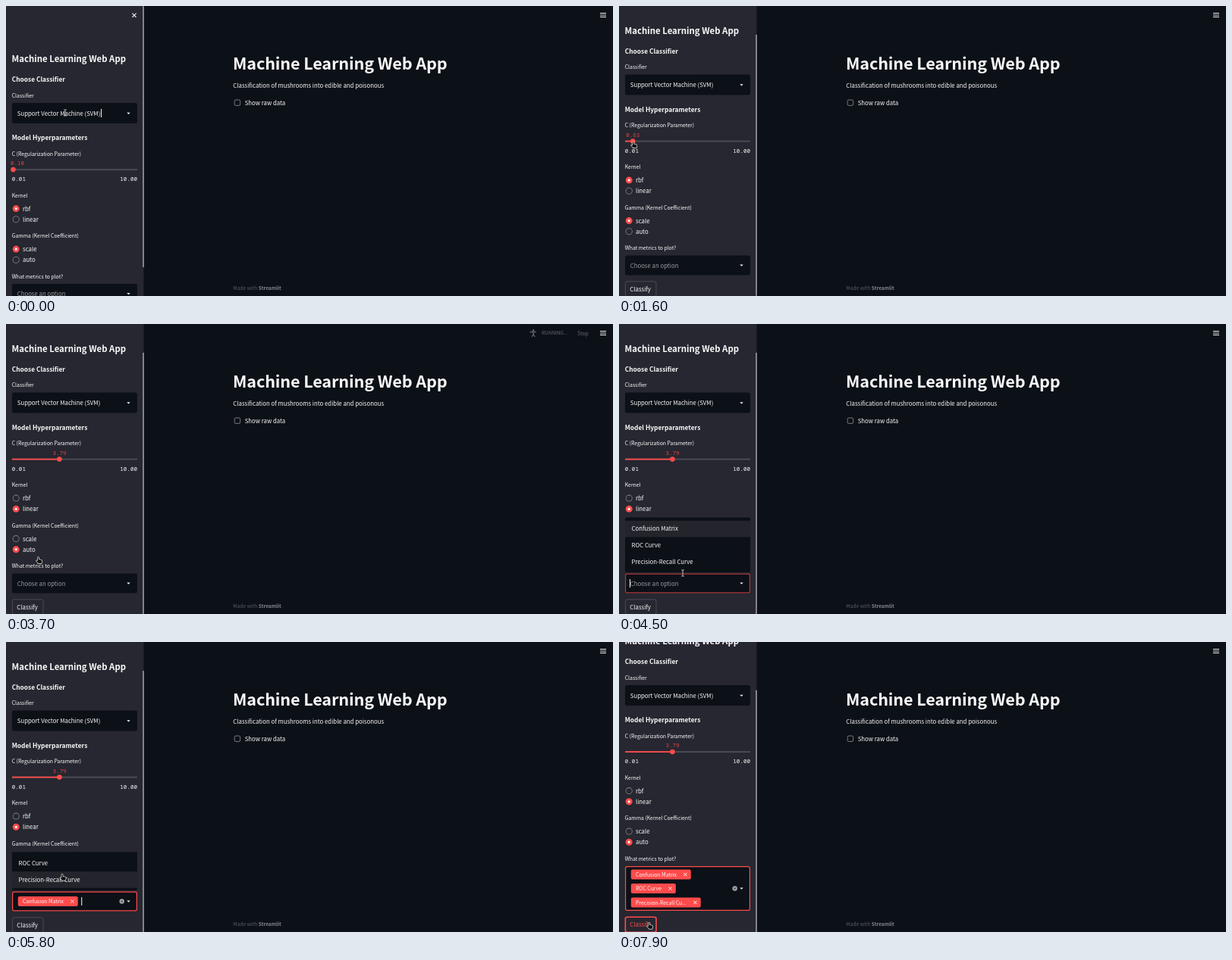
These frames come from a looping animation (800 by 383 pixels, 8 s). An HTML page with a canvas:

```html
<!DOCTYPE html>
<html lang="en">
<head>
<meta charset="utf-8">
<title>Machine Learning Web App</title>
<style>
html, body { margin: 0; width: 100%; height: 100%; overflow: hidden; background: #0c1017; }
canvas { display: block; width: 800px; height: 383px; }
</style>
</head>
<body>
<canvas id="stage"></canvas>
<script>
const W = 800, H = 383, LOOP = 8000, STEP = 100;
const SANS = '"Noto Sans CJK JP", "Noto Sans CJK SC", "Noto Sans CJK", "Noto Sans", sans-serif';
const MONO = '"Noto Sans Mono", monospace';
const DARK = '#0c1017', PANEL = '#262730', WHITE = '#fafafa', RED = '#ff4b4b', GREY = '#85868c';
const BODY = 8.72, SMALL = 7.68, HEAD = 9.37;
const canvas = document.getElementById('stage'), g = canvas.getContext('2d');
const dpr = window.devicePixelRatio || 1;
canvas.width = W * dpr;
canvas.height = H * dpr;

// Moments of each action
const FOCUS = 300, GRAB = 1550, DROP = 1900, LINEAR = 2750, AUTO = 3500, OPEN = 4400,
      PICKS = [5000, 6150, 7300], HOVER = 7800;
const RERUNS = [100, 2050, LINEAR, AUTO, ...PICKS];
const METRICS = ['Confusion Matrix', 'ROC Curve', 'Precision-Recall Curve'];

const SCROLL = [[0, 0], [800, 0], [900, 1.7], [1200, 37.5], [7400, 37.5], [7700, 71]];
const VALUE = [[0, 0.1], [GRAB, 0.1], [DROP, 3.79]];
const MOUSE = [
  [0, 78, 141], [350, 78, 141], [900, 79.5, 192.5], [1250, 60, 185], [1450, 10, 179],
  [GRAB, 10, 179], [DROP, 70.5, 179], [2050, 70.5, 179], [2600, 38, 245], [2800, 41, 247],
  [3300, 30, 297], [3600, 30, 297], [4000, 80, 340], [OPEN, 82, 342], [4500, 84, 329],
  [4800, 70, 272], [5000, 70, 272], [5800, 74, 306.5], [6000, 66, 293], [6200, 66, 293],
  [7100, 83, 320], [7250, 80, 314], [7350, 80, 314], [7750, 45, 368], [7900, 39.5, 370.5]
];
const POINTERS = [[0, beam], [550, arrow], [1400, hand], [2050, arrow], [2500, hand], [4000, beam], [4600, hand]];

function at(track, t) {
  const i = track.findIndex(k => k[0] > t);
  if (i < 0) return track[track.length - 1].slice(1);
  const a = track[i - 1], b = track[i], u = (t - a[0]) / (b[0] - a[0]);
  return a.slice(1).map((v, j) => v + (b[j + 1] - v) * u);
}

function sansFont(size, weight = 400) {
  g.font = `${weight} ${size / 1.1176}px ${SANS}`;
}

// y is the middle of the capitals
function text(s, x, y, size = BODY, color = WHITE, weight = 400, spacing = 0) {
  sansFont(size, weight);
  g.letterSpacing = spacing + 'px';
  g.fillStyle = color;
  g.fillText(s, x, y + size * 0.33);
  g.letterSpacing = '0px';
  return g.measureText(s).width;
}

function mono(s, x, y, color = WHITE, align = 'left') {
  g.font = `7.57px ${MONO}`;
  g.fillStyle = color;
  g.textAlign = align;
  g.fillText(s, x, y + 2.7);
  g.textAlign = 'left';
}

function box(x, y, w, h, r, fill, stroke, lw = 1) {
  g.beginPath();
  g.roundRect(x, y, w, h, r);
  if (fill) { g.fillStyle = fill; g.fill(); }
  if (stroke) { g.strokeStyle = stroke; g.lineWidth = lw; g.stroke(); }
}

// Dark input with a red border that fades in from the moment of focus
function field(y, h, focus) {
  box(8, y, 165, h, 2.5, DARK);
  g.globalAlpha = Math.max(0, Math.min(1, focus / 150));
  box(8.6, y + 0.6, 163.8, h - 1.2, 2.2, null, RED, 1.2);
  g.globalAlpha = 1;
}

function dot(x, y, r, color) {
  g.beginPath();
  g.arc(x, y, r, 0, 7);
  g.fillStyle = color;
  g.fill();
}

function draw(d, color, lw) {
  g.strokeStyle = color;
  g.lineWidth = lw;
  g.stroke(new Path2D(d));
}

function cross(x, y, r, color, lw) {
  draw(`M${x - r} ${y - r}l${2 * r} ${2 * r}M${x + r} ${y - r}l${-2 * r} ${2 * r}`, color, lw);
}

function chevron(y) {
  g.fillStyle = WHITE;
  g.fill(new Path2D(`M159.3 ${y - 1}h4.4l-2.2 2.3z`));
}

function radio(label, y, on, fade = 0) {
  dot(13.2, y, 4.5, on ? RED : GREY);
  if (on) dot(13.2, y, 1.6, WHITE);
  else {
    dot(13.2, y, 3.7, PANEL);
    if (fade > 0) { g.globalAlpha = fade; dot(13.2, y, 3.7, '#66645f'); g.globalAlpha = 1; }
  }
  text(label, 22, y + 0.3);
}

function shape(d) {
  const p = new Path2D(d);
  g.lineJoin = 'round';
  g.strokeStyle = '#fff';
  g.lineWidth = 1.2;
  g.stroke(p);
  g.fillStyle = '#111';
  g.fill(p);
  g.lineJoin = 'miter';
}
function arrow() { shape('M0 0V7.6L1.7 6L2.9 8.6L4 8.1L2.9 5.6H5.2Z'); }
function hand() {
  shape('M-.7 .5Q0 -.5 .7 .5V3.2L4.2 4Q5 4.3 4.9 5.2L4.3 8.3H.2L-2.6 5.2Q-2.4 4.1 -1.4 4.7L-.7 5.2Z');
}
function beam() {
  draw('M-1.8 -4.3Q0 -4.3 0 -3.2Q0 -4.3 1.8 -4.3M0 -3.5V3.5M-1.8 4.3Q0 4.3 0 3.2Q0 4.3 1.8 4.3', '#d0d0d2', 0.9);
}

function page(t) {
  g.fillStyle = DARK;
  g.fillRect(0, 0, W, H);
  text('Machine Learning Web App', 299, 76, 24.13, WHITE, 700, -0.12);
  text('Classification of mushrooms into edible and poisonous', 299.3, 105.2);
  box(301.2, 124, 7.4, 7.4, 1.5, null, GREY, 0.9);
  text('Show raw data', 314.7, 127.8);
  const w = text('Made with ', 299.3, 372.6, 7.42, '#5a5d64');
  text('Streamlit', 299.3 + w, 372.6, 7.28, '#85878d', 600);
  draw('M783 9.5h8M783 12h8M783 14.5h8', WHITE, 0.95);

  const start = RERUNS.find(r => t > r && t < r + 350);
  if (start === undefined) return;
  g.globalAlpha = 0.4 * Math.sin(Math.PI * (t - start) / 350) ** 2;
  dot(695, 8.3, 1.2, WHITE);
  draw('M690.5 10.5h8M695 10v3.5l-2 3.5M695 13.5l2 3.5', WHITE, 1.3);
  text('RUNNING...', 706, 12, 7.2);
  text('Stop', 753, 12, SMALL);
  g.globalAlpha = 1;
}

function multiselect(t, count, h) {
  const y = 367, mid = y + h / 2;
  field(y, h, t - OPEN);
  let end = 9.5;
  if (!count) text('Choose an option', 14.7, mid + 0.2, BODY, '#9a9ba0');
  for (let i = 0; i < count; i++) {
    const name = METRICS[i], c = count === 1 ? mid : y + 11 + 18.5 * i;
    const label = name.length > 19 ? name.slice(0, 19) + '...' : name;
    sansFont(SMALL);
    const w = g.measureText(label).width + 25;
    box(15.8, c - 6.5, w, 13, 2, RED);
    text(label, 22, c + 0.2, SMALL);
    cross(15.8 + w - 7.3, c, 2.1, WHITE, 1);
    end = 15.8 + w;
  }
  if (count) {
    dot(152.7, mid, 3.2, '#a5a6aa');
    cross(152.7, mid, 1.1, DARK, 0.8);
  }
  chevron(mid);
  if (t >= OPEN && count < 2) draw(`M${end + 5} ${mid - 5.5}v11`, WHITE, 1);
}

function menu(items, mouseY) {
  const row = 21.7, bottom = 328, top = bottom - row * items.length - 7.4, first = top + 4.2;
  box(8, top, 165, bottom - top, 2, DARK);
  const hit = Math.floor((mouseY - first) / row);
  const active = hit >= 0 && hit < items.length ? hit : 0;
  items.forEach((name, i) => {
    const y = first + row * i;
    if (i === active) { g.fillStyle = '#23242c'; g.fillRect(8, y, 165, row); }
    text(name, 16.5, y + row / 2 - 0.3);
  });
}

function sidebar(t, mouseY) {
  const [scroll] = at(SCROLL, t), [value] = at(VALUE, t);
  const count = PICKS.filter(p => t >= p).length;
  const boxH = Math.max(26, 3.5 + 18.5 * count), grow = boxH - 26;
  const linear = t >= LINEAR, auto = t >= AUTO;

  g.save();
  g.beginPath();
  g.rect(0, 0, 182, H);
  g.clip();
  g.fillStyle = PANEL;
  g.fillRect(0, 0, 181.5, H);

  g.save();
  g.translate(0, -scroll);
  cross(169, 12.2, 2.6, WHITE, 1.1);
  text('Machine Learning Web App', 7.6, 70.3, 12.72, WHITE, 600);
  text('Choose Classifier', 7.7, 97, HEAD, WHITE, 600);
  text('Classifier', 7.7, 118.2, SMALL);
  const focused = t < GRAB;
  field(128, 27, focused ? t - FOCUS : 0);
  const w = text('Support Vector Machine (SVM)', 14.8, 141.8);
  if (focused) draw(`M${16 + w} 136v11`, WHITE, 1);
  chevron(141.8);

  text('Model Hyperparameters', 7.7, 174, HEAD, WHITE, 600);
  text('C (Regularization Parameter)', 7.7, 195, SMALL);
  const x = 8 + 165 * (value - 0.01) / 9.99;
  mono(value.toFixed(2), Math.max(6, x - 9), 207.6, '#dc4448');
  g.fillStyle = '#4d4e56';
  g.fillRect(8, 215.2, 165, 1.8);
  g.fillStyle = RED;
  g.fillRect(8, 215.2, x - 8, 1.8);
  dot(x, 216.1, 3.3, RED);
  mono('0.01', 7.8, 228.7);
  mono('10.00', 173, 228.7, WHITE, 'right');

  text('Kernel', 7.7, 250.4, SMALL);
  radio('rbf', 267.6, !linear, 1 - (t - LINEAR) / 200);
  radio('linear', 281.8, linear);
  text('Gamma (Kernel Coefficient)', 7.7, 303.7, SMALL);
  radio('scale', 321.1, !auto, 1 - (t - AUTO) / 200);
  radio('auto', 335.2, auto);
  text('What metrics to plot?', 7.7, 357.2, SMALL);
  multiselect(t, count, boxH);

  const hot = t >= HOVER;
  box(8.4, 401.3 + grow, 40.6, 20, 2.5, null, hot ? RED : '#53545c', hot ? 1.6 : 0.8);
  text('Classify', 14.3, 411.4 + grow, BODY, hot ? RED : WHITE);
  g.restore();

  if (t >= OPEN && count < METRICS.length) menu(METRICS.slice(count), mouseY);

  // Scrollbar
  const total = 420.5 + grow, len = H * H / total - 3.5;
  const top = scroll / (total - H) * (H - len);
  box(180.2, top, 1.6, len, 0.8, '#9c9da3');
  g.restore();
}

function frame(now) {
  const t = Math.floor(now % LOOP / STEP) * STEP;
  const [mx, my] = at(MOUSE, t);
  g.setTransform(dpr, 0, 0, dpr, 0, 0);
  page(t);
  sidebar(t, my);
  g.translate(mx, my);
  POINTERS.filter(p => p[0] <= t).pop()[1]();
}

const begin = performance.now();
function tick() {
  frame(performance.now() - begin);
  requestAnimationFrame(tick);
}
tick();
</script>
</body>
</html>
```
